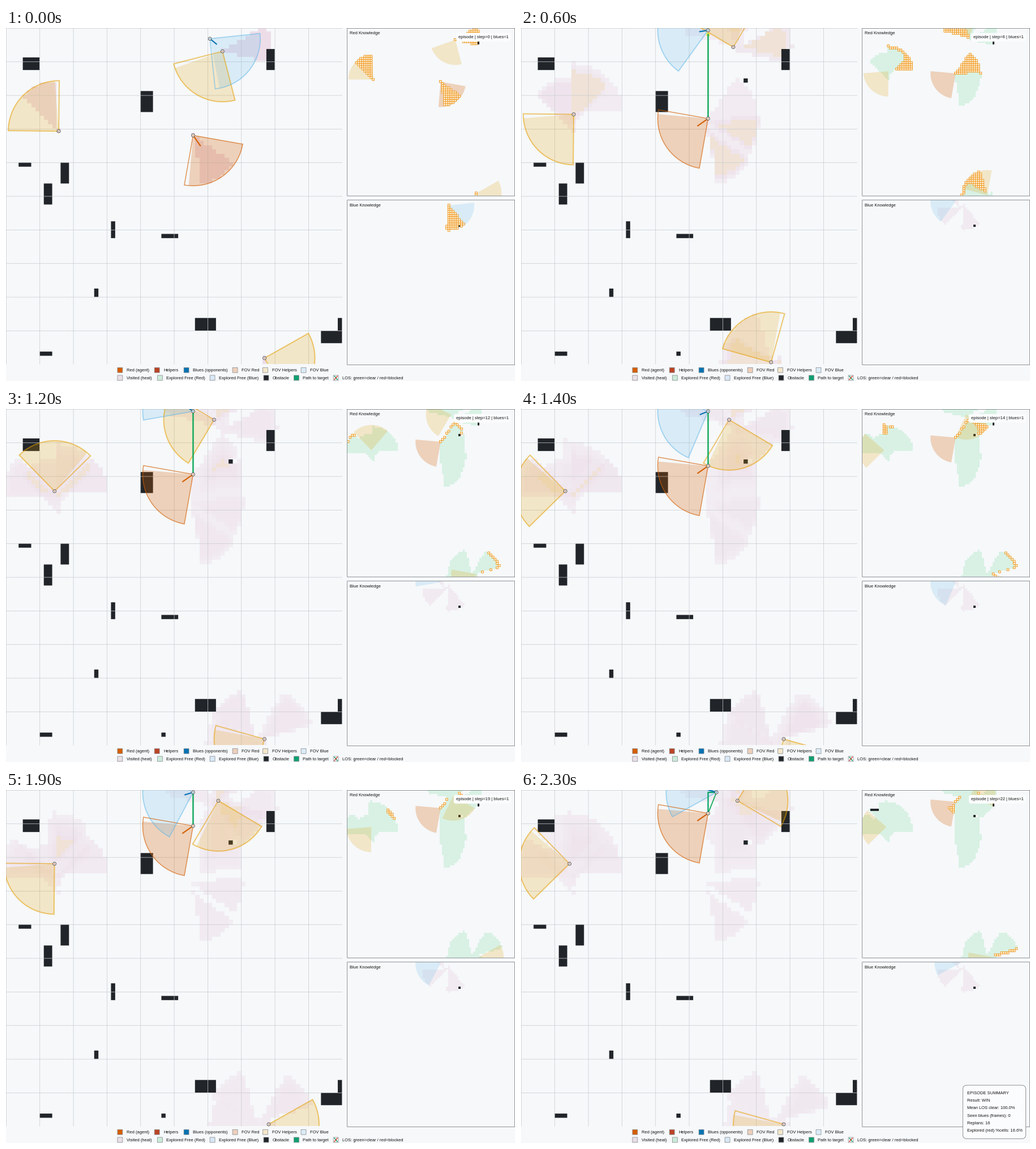
Write a matplotlib script that moves like this. It is 899 by 623 pixels and loops after 2400 ms.

```python
import numpy as np
import matplotlib.pyplot as plt
from matplotlib.animation import FuncAnimation
from matplotlib.collections import PolyCollection
from matplotlib.colors import to_rgb
from matplotlib.patches import Circle, FancyBboxPatch, Polygon, Rectangle

plt.rcParams["path.snap"] = False
plt.rcParams["font.family"] = "Liberation Sans"

DPI = 100
W, H = 1212, 840               # layout units, shown at 899 x 623 pixels
UNIT = 899 / W * 72 / DPI      # points per layout unit
N, CELL, MINI, REACH = 80, 10, 5, 12
LAST = 22
RED_PANEL, BLUE_PANEL = (812, 0), (812, 409)

BG, INK = "#f6f8fa", "#212529"
RED, BLUE, GREEN, GOLD = "#d55e00", "#0072b2", "#00a065", "#e69f00"
SKY, PINK, MINT, FRONT, TAN = "#56b4e9", "#cc79a7", "#7fdca4", "#f39a1f", "#d98a4a"

# Key poses (step, column, row, heading): cells are interpolated, headings held.
RED_KEYS = [(0, 44, 25, 55), (1, 44, 24, 55), (3, 44, 23, 100),
            (6, 44, 21, 145), (22, 44, 5, 145)]
BLUE_KEYS = [(0, 48, 2, 39), (1, 47, 3, 318), (2, 46, 3, 232), (3, 45, 2, 232),
             (6, 44, 0, 171), (8, 45, 0, 171), (9, 44, 0, 215),
             (14, 44, 0, 158), (19, 44, 0, 163), (21, 46, 0, 163), (22, 46, 0, 196)]
WEST_KEYS = [(0, 12, 24, 225.6), (2, 12, 23, 180.6), (6, 12, 20, 135.6),
             (9, 12, 20, 270.6), (14, 10, 19, 180.6), (19, 11, 17, 135.6),
             (21, 11, 17, 225.6), (22, 11, 17, 180.6)]
NORTH_KEYS = [(0, 51, 5, 120.6), (3, 52, 4, 210.6), (6, 50, 4, 255.6),
              (9, 49, 3, 165.6), (14, 49, 2, 75.6), (19, 50, 2, 75.6),
              (22, 51, 2, 345.6)]
SOUTH_KEYS = [(0, 61, 78, 15.6), (3, 61, 79, 285.6), (6, 59, 79, 240.6),
              (9, 59, 78, 150.6), (14, 62, 78, 60.6), (19, 62, 79, 15.6),
              (22, 62, 79, 150.6)]

# Obstacles as column, row, width, height; the last two turn up later.
BLOCKS = [(4, 7, 4, 3), (32, 15, 3, 5), (62, 5, 2, 5), (3, 32, 3, 1),
          (13, 32, 2, 5), (9, 37, 2, 5), (25, 46, 1, 4), (37, 49, 4, 1),
          (21, 62, 1, 2), (45, 69, 5, 3), (79, 69, 1, 3), (75, 72, 5, 3),
          (8, 77, 3, 1), (53, 12, 1, 1), (37, 77, 1, 1)]

ROWS, COLS = np.mgrid[:N, :N]
WALLS = np.zeros((N, N), bool)
for bx, by, bw, bh in BLOCKS:
    WALLS[by:by + bh, bx:bx + bw] = True


def track(keys):
    k = np.array(keys)
    steps = np.arange(LAST + 1)
    x, y = (np.rint(np.interp(steps, k[:, 0], k[:, j])).astype(int) for j in (1, 2))
    heading = k[np.searchsorted(k[:, 0], steps, side="right") - 1, 3]
    return list(zip(x, y, heading))


def look(x, y, heading):
    """Cells seen from (x, y): a 45 degree wedge with blocked sight lines."""
    dx, dy = COLS - x, ROWS - y
    turn = (np.degrees(np.arctan2(dx, dy)) - heading + 45) % 360
    seen = (turn <= 45) & (np.hypot(dx, dy) <= REACH)
    for r, c in np.argwhere(seen):
        t = np.linspace(0, 1, 26)[1:-1]
        cs = np.rint(x + (c - x) * t).astype(int)
        rs = np.rint(y + (r - y) * t).astype(int)
        before = (cs != c) | (rs != r)
        seen[r, c] = not (WALLS[rs, cs] & before).any()
    seen[y, x] = True
    return seen


def sweep(poses):
    """Look on arrival with the old heading, then again after the turn."""
    before = [poses[0]] + poses[:-1]
    return np.array([look(*p) | look(p[0], p[1], q[2]) for p, q in zip(poses, before)])


red, blue = track(RED_KEYS), track(BLUE_KEYS)
helpers = [track(k) for k in (WEST_KEYS, NORTH_KEYS, SOUTH_KEYS)]
heat = sum(sweep(p).astype(int) for p in [red] + helpers).cumsum(0)
blue_heat = np.array([look(*p) for p in blue]).cumsum(0)

fig = plt.figure(figsize=(8.99, 6.23), dpi=DPI, facecolor=BG)
ax = fig.add_axes([0, 0, 1, 1])


def label(x, mid, text, **kw):
    ax.text(x, mid + 3.6, text, fontsize=10.1 * UNIT, color="#111111", zorder=20, **kw)


def box(x, y, w, h, fill, edge="none", z=1):
    patch = Rectangle((x, y), w, h, fc=fill, ec=edge, lw=UNIT, zorder=z)
    ax.add_patch(patch)
    return patch


def line(pts, color, lw, z):
    xs, ys = zip(*pts)
    ax.plot(xs, ys, color=color, lw=lw * UNIT, zorder=z)


def cells(layers, origin, size, clip):
    """Paint (mask, colour, alpha) layers as one image of grid cells."""
    img = np.zeros((N, N, 4))
    for mask, color, alpha in layers:
        img[mask, :3] = to_rgb(color)
        img[mask, 3] = np.broadcast_to(alpha, mask.shape)[mask]
    x, y = origin
    art = ax.imshow(img, extent=(x, x + N * size, y + N * size, y),
                    aspect="auto", interpolation="nearest", zorder=1)
    art.set_clip_path(clip)


def centre(pose, origin=(0, 0), size=CELL):
    return tuple(o + (p + .5) * size + .5 for o, p in zip(origin, pose))


def ray(pose, length, degrees, origin=(0, 0), size=CELL):
    a = np.radians(degrees)
    x, y = centre(pose, origin, size)
    return x + length * size * np.cos(a), y + length * size * np.sin(a)


def sector(pose, origin, size, clip, color, fill, edge=0, lw=2):
    # the tint stops one 5 degree facet short of the outline
    arc = pose[2] - 45 + np.arange(0, 91, 5)
    pts = [centre(pose, origin, size)]
    pts += [ray(pose, REACH, a, origin, size) for a in arc]
    shapes = [Polygon(pts[:-1], fc=color, ec="none", alpha=fill, zorder=5)]
    if edge:
        shapes.append(Polygon(pts, fill=False, ec=color, lw=lw * UNIT,
                              alpha=edge, zorder=5.1))
    for p in shapes:
        ax.add_patch(p)
        p.set_clip_path(clip)


def squares(mask, origin, clip):
    corner = np.array([[0, 0], [1, 0], [1, 1], [0, 1]])
    verts = [origin + (corner + (c, r)) * MINI for r, c in np.argwhere(mask)]
    if verts:
        art = PolyCollection(verts, facecolors="#fbf3e2", edgecolors=FRONT,
                             linewidths=1.3 * UNIT, zorder=7)
        ax.add_collection(art)
        art.set_clip_path(clip)


def marker(pose, color):
    ax.add_patch(Circle(centre(pose), 3.8, fc="white", ec="#444444",
                        lw=1.2 * UNIT, zorder=10))
    ax.add_patch(Circle(centre(pose), 1.2, fc=color, ec="none", zorder=11))


def draw_path(s):
    # the pursuit aims at where blue stood one step earlier
    start, goal = centre(red[s]), centre(blue[s - 1])
    if blue[s - 1][:2] != blue[s][:2]:
        box(goal[0] - 4, goal[1] - 4, 8, 8, "#f0e442", z=7)
    line([start, (start[0], goal[1]), goal], GREEN, 3, 8)
    line([goal, start], "#1fae5f", 2.5, 8)


def draw_world(s):
    clip = box(0, 0, N * CELL, N * CELL, BG, z=0)
    for x, y, w, h in BLOCKS if s > 1 else BLOCKS[:-2]:
        box(x * CELL, y * CELL, w * CELL, h * CELL, INK, z=1.5)
    share = heat[s] / heat[s].max()
    layers = [(share >= .1, PINK, .07 + .14 * share)]
    if s > 3:
        layers.append((share >= .75, TAN, .2))
    cells(layers, (0, 0), CELL, clip)
    for g in np.arange(0, N, 8) * CELL + .5:
        line([(g, 0), (g, N * CELL)], "#c9ccd0", 1, 2)
        line([(0, g), (N * CELL, g)], "#c9ccd0", 1, 2)

    sector(red[s], (0, 0), CELL, clip, RED, .25, .65)
    for h in helpers:
        sector(h[s], (0, 0), CELL, clip, GOLD, .2, .55, 2.7)
    sector(blue[s], (0, 0), CELL, clip, SKY, .18, .5, 2.4)
    if s:
        draw_path(s)
    for poses, length, color in ((red, 3, RED), (blue, 2, BLUE)):
        line([centre(poses[s]), ray(poses[s], length, poses[s][2])], color, 2.8, 9)
        marker(poses[s], color)
    for h in helpers:
        marker(h[s], "#b8452a")


def draw_panel(s, origin, height, title, counts, tint, views):
    x, y = origin
    clip = box(x + .5, y + .5, 399, height, BG, z=0)
    box(x + .5, y + .5, 399, height, "none", "#6f7277", z=12)
    label(x + 6, y + 11.5, title)
    known = counts[s] > 0
    new = known & (counts[s - 1] == 0) if s else known
    cells([(known & ~WALLS, *tint), (known & WALLS, INK, 1)], origin, MINI, clip)
    for poses, color, alpha in views:
        sector(poses[s], origin, MINI, clip, color, alpha)
    squares(new & ~WALLS, origin, clip)


LEGEND = [
    (814, [(265, RED, "Red (agent)"), (353, "#bb4426", "Helpers"),
           (423, BLUE, "Blues (opponents)"), (539, "#edd0bc", "FOV Red"),
           (611, "#f3e6ca", "FOV Helpers"), (702, "#daecf7", "FOV Blue")]),
    (832.5, [(265, "#eadfe6", "Visited (heat)"), (360, "#cbecd9", "Explored Free (Red)"),
             (485, "#d8e8f6", "Explored Free (Blue)"), (613, INK, "Obstacle"),
             (685, "#0f9f70", "Path to target"),
             (779, "white", "LOS: green=clear / red=blocked")]),
]
SUMMARY = ["EPISODE SUMMARY", "Result: WIN", "Mean LOS clear: 100.0%",
           "Seen blues (frames): 0", "Replans: 16", "Explored (red) %cells: 16.6%"]


def draw_legend():
    for mid, items in LEGEND:
        for x, color, text in items:
            box(x + .5, mid - 6, 12, 12, color, "#85888d", z=3)
            label(x + 22, mid, text)
    line([(x + 3, mid - 4), (x + 10, mid + 4)], GREEN, 1.9, 4)
    line([(x + 3, mid + 4), (x + 10, mid - 4)], "#d9382b", 1.9, 4)


def draw_summary():
    ax.add_patch(FancyBboxPatch(
        (1052, 702.5), 150, 127.5, boxstyle="round,pad=0,rounding_size=10",
        fc="#fbfcfd", ec="#6d7075", lw=UNIT, zorder=18))
    for k, text in enumerate(SUMMARY):
        label(1063, 720 + 18 * k, text)


def update(i):
    s = min(i, LAST)
    ax.clear()
    draw_world(s)
    draw_panel(s, RED_PANEL, 399, "Red Knowledge", heat, (MINT, .25),
               [(red, RED, .25)] + [(h, GOLD, .2) for h in helpers])
    draw_panel(s, BLUE_PANEL, 392, "Blue Knowledge", blue_heat, (PINK, .1),
               [(blue, SKY, .18)])
    draw_legend()
    label(1197, 20.5, f"episode | step={s} | blues=1", ha="right",
          bbox=dict(boxstyle="round,pad=.55", fc="#fbfcfd", ec="none"))
    if i > LAST:
        draw_summary()
    ax.set_xlim(0, W)
    ax.set_ylim(H, 0)
    ax.axis("off")
    return []


anim = FuncAnimation(fig, update, frames=LAST + 2, interval=100,
                     init_func=lambda: [], repeat=True, repeat_delay=0)
plt.show()
```
